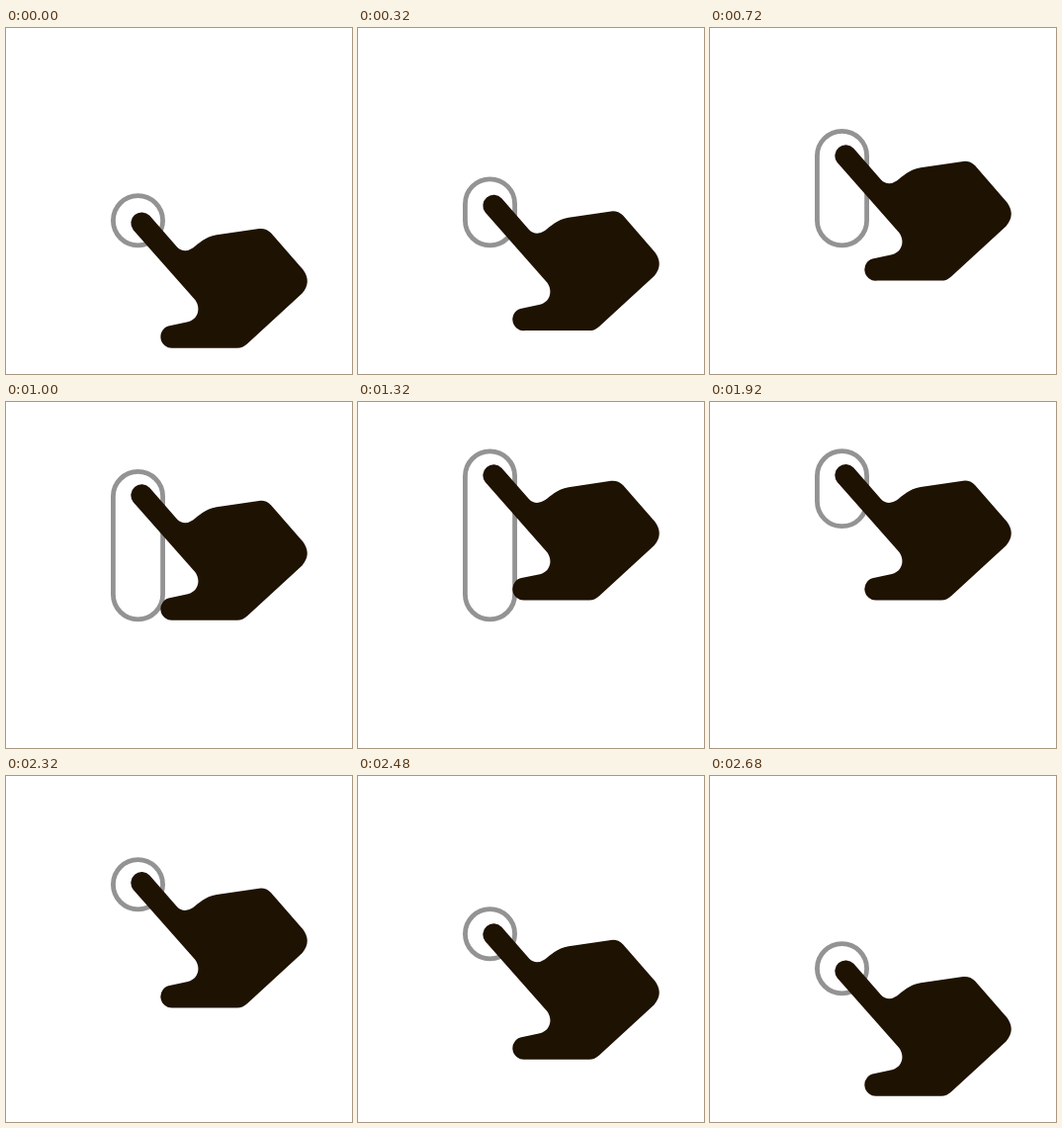
Write an HTML page that moves like this. It is 350 by 350 pixels and loops after 2.84 s.

```html
<!DOCTYPE html>
<html lang="en">
<head>
<meta charset="utf-8">
<title>Swipe up gesture</title>
<style>
  html, body { margin: 0; width: 100%; height: 100%; overflow: hidden; background: #fff; }
  svg { display: block; width: 100%; height: 100%; }
</style>
</head>
<body>
<svg viewBox="0 0 350 350">
  <rect id="trail" x="108.4" width="50.2" rx="25.1" fill="none" stroke="#939393" stroke-width="4.8"/>
  <path id="hand" fill="#1e1202" d="M145.3 189.8 L173 221.5 Q180 228.5 189 222.5 C195 218 201 211.5 213 209.3
    L256 203 Q263 202.2 268 207.2 L300.5 244.5 Q309.5 257 299.5 268.5 L244 319.5 Q239.5 323.7 234 323.7
    L169 323.7 A11.2 11.2 0 0 1 166.5 301 L184 297.3 C194 295 197.5 284 191.5 275.3
    L128.7 204.2 A11 11 0 0 1 145.3 189.8 Z"/>
</svg>
<script>
  const LOOP = 2840, STEP = 40;
  const TRAIL_RISE = 120, HAND_RISE = 123.3;
  const CIRCLE_TOP = 169.6, CIRCLE_SIZE = 50.2;
  const trail = document.getElementById('trail');
  const hand = document.getElementById('hand');

  // Smooth progress from 0 to 1 between two times
  const ease = (t, from, to) => {
    const p = Math.min(1, Math.max(0, (t - from) / (to - from)));
    return p * p * (3 - 2 * p);
  };

  function draw(now) {
    const t = Math.floor(now % LOOP / STEP) * STEP;
    const handUp = HAND_RISE * (ease(t, 0, 1346) - ease(t, 2130, 2680));
    const drop = ease(t, 2120, 2680);
    const topUp = TRAIL_RISE * (ease(t, 0, 1360) - drop);
    const bottomUp = TRAIL_RISE * (ease(t, 1584, 2064) - drop);

    hand.setAttribute('transform', `translate(0 ${-handUp})`);
    trail.setAttribute('y', CIRCLE_TOP - topUp);
    trail.setAttribute('height', CIRCLE_SIZE + topUp - bottomUp);
  }

  const start = performance.now();
  function tick() {
    draw(performance.now() - start);
    requestAnimationFrame(tick);
  }
  tick();
</script>
</body>
</html>
```
